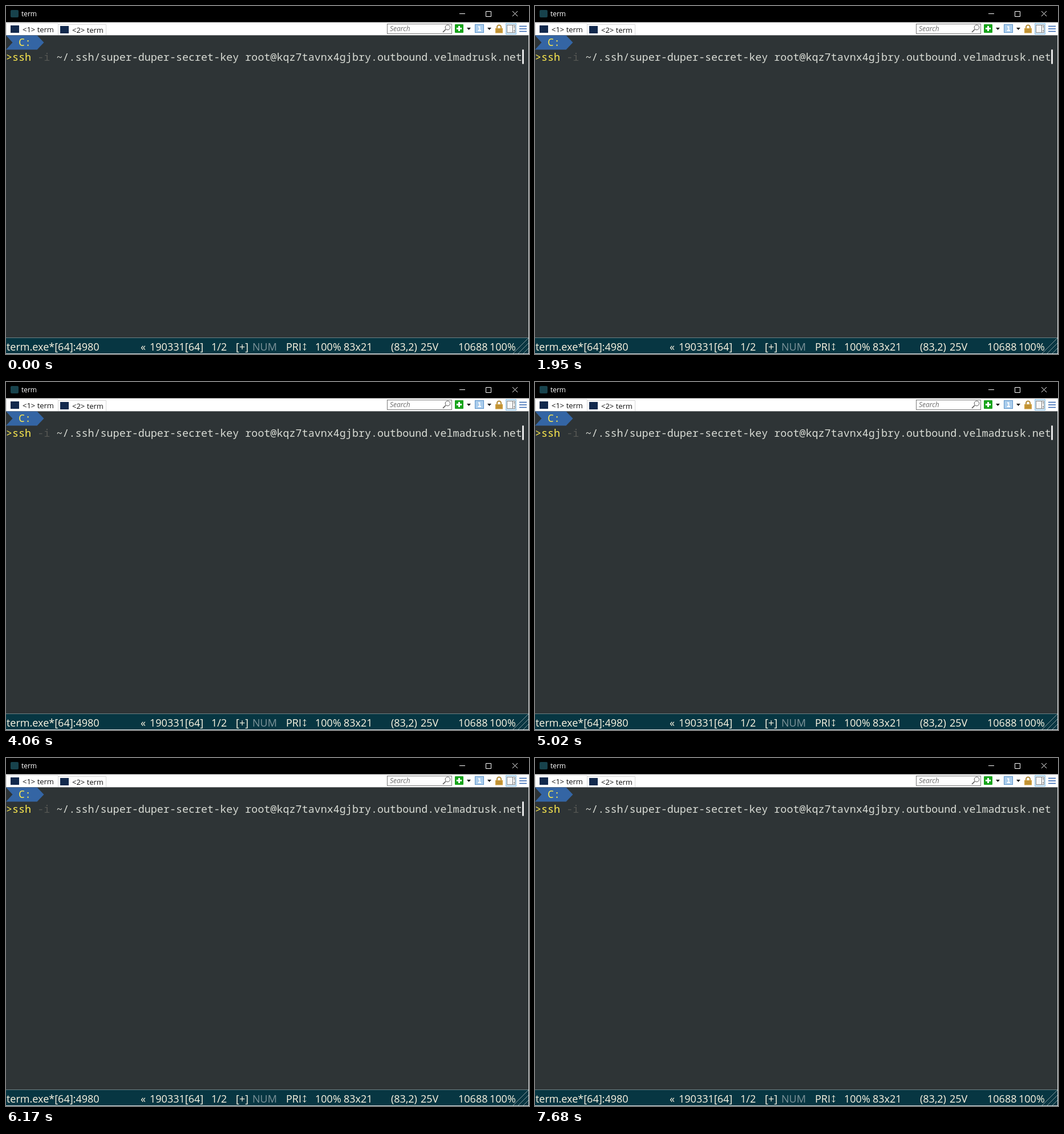
Recreate the animation shown at these times as an HTML page. Size 917 by 610 pixels, loop 8000 ms.

```html
<!DOCTYPE html>
<html lang="en">
<head>
<meta charset="utf-8">
<title>Terminal</title>
<style>
  html, body { margin: 0; width: 100%; height: 100%; overflow: hidden; background: #2e3436; }
  svg { display: block; }
  text { white-space: pre; }
  .ui { font: 12px "Open Sans", "Noto Sans", sans-serif; }
  .tab { font-size: 13px; }
  .hint { font-style: italic; fill: #6d6d6d; }
  .status { font-size: 18px; fill: #fdf6e3; }
  .mono { font: 18.4px "Noto Sans Mono", "DejaVu Sans Mono", monospace; fill: #d9dcd5; }
  .line { fill: none; stroke-width: 1; }
  .yellow { fill: #fce94f; }
</style>
</head>
<body>
<svg width="917" height="610" viewBox="0 0 917 610">
  <rect width="917" height="610" fill="#2e3436"/>

  <!-- title bar -->
  <rect width="917" height="29" fill="#000"/>
  <rect x="8" y="7" width="14" height="13" rx="2" fill="#17424c"/>
  <text class="ui" x="27" y="18" fill="#fff">term</text>
  <path class="line" stroke="#fff" d="M795 13.5h10M841.5 9.5h9v9h-9zM888 9l9 9m0-9l-9 9"/>

  <!-- tabs -->
  <rect y="28.5" width="917" height="22.8" fill="#fff"/>
  <path class="line" stroke="#d9d9d9" d="M.5 51V30.5H91.5V51M91.5 32.5H175.5V51"/>
  <g fill="#12294d">
    <rect x="8" y="34" width="15" height="13"/>
    <rect x="95" y="35" width="15" height="13"/>
  </g>
  <g class="ui" fill="#111">
    <text class="tab" x="29" y="46">&lt;1&gt; term</text>
    <text class="tab" x="116" y="47">&lt;2&gt; term</text>
  </g>

  <!-- toolbar -->
  <rect x="668.5" y="31.5" width="113" height="17" fill="#fff" stroke="#7a7a7a"/>
  <text class="ui hint" x="673" y="44">Search</text>
  <g class="line" stroke="#555">
    <circle cx="774.5" cy="37.5" r="4.3"/>
    <path d="M771 41l-5 5" stroke-width="1.6"/>
  </g>
  <rect x="787" y="32" width="15" height="15" rx="1" fill="#17a31b"/>
  <path d="M794.5 35v9M790 39.5h9" stroke="#fff" stroke-width="3"/>
  <path d="M808 38h7l-3.5 4zM844 38h7l-3.5 4z" fill="#111"/>
  <rect x="822.5" y="32.5" width="15" height="14" fill="#a9ccec" stroke="#5b93c9"/>
  <path d="M828 36.5h2.5v6M827.5 43h5.5" fill="none" stroke="#fff" stroke-width="1.8"/>
  <path d="M861 40v-3a3.5 3.5 0 0 1 7 0v3" fill="none" stroke="#b48a35" stroke-width="2"/>
  <rect x="858" y="39" width="13" height="8.5" fill="#cc9c3b"/>
  <path d="M860 42h9M860 45h9" stroke="#a97c24"/>
  <rect x="876.5" y="30.5" width="18" height="19" fill="#d3e9f8" stroke="#8fc3e8"/>
  <rect x="878.5" y="33.5" width="14" height="13" fill="#f7f7f7" stroke="#8a8a8a"/>
  <path d="M888.5 34v12M890 36.5h2M890 43.5h2" stroke="#777"/>
  <path d="M900 35.5h13M900 40h13M900 44.5h13" stroke="#2f62ae" stroke-width="1.7"/>

  <!-- prompt -->
  <path d="M0 51.5H54.5L66.5 64L54.5 76.5H0L11.5 64z" fill="#3465a4"/>
  <text class="mono yellow" x="22" y="70">C:</text>
  <text class="mono" x="0" y="95.6"><tspan class="yellow">&gt;ssh</tspan><tspan fill="#555753"> -i</tspan> ~/.ssh/super-duper-secret-key root@kqz7tavnx4gjbry.outbound.velmadrusk.net</text>
  <rect id="cursor" x="905.2" y="76.4" width="2.6" height="25.2" fill="#fff"/>

  <!-- status bar -->
  <rect y="581" width="917" height="28" fill="#073642"/>
  <path d="M0 581.5h917" stroke="#6d7f84"/>
  <g class="ui" id="status"></g>
  <path class="line" stroke="#fdf6e3" d="M523.5 592v11M521 594.5l2.5-3 2.5 3M521 600.5l2.5 3 2.5-3"/>
  <path class="line" stroke="#8b9da0" d="M889 609l27-27M898 609l18-18M907 609l9-9"/>
  <path class="line" stroke="#e4e6e6" d="M916.5 51v559M0 609.5h917"/>
</svg>
<script>
  const status = [
    [1, "term.exe*[64]:4980"], [236, "«"], [252, "190331[64]"], [360, "1/2"],
    [403, "[+]"], [432, "NUM", "#7f959b"], [491, "PRI"], [542, "100%"],
    [592, "83x21"], [675, "(83,2)"], [727, "25V"], [793, "10688"], [848, "100%"]
  ];
  const bar = document.getElementById("status");
  for (const [x, label, color] of status) {
    const text = document.createElementNS(bar.namespaceURI, "text");
    text.setAttribute("class", "status");
    text.setAttribute("x", x);
    text.setAttribute("y", 604);
    if (color) text.style.fill = color;
    text.textContent = label;
    bar.append(text);
  }

  // The cursor starts visible and flips at each of these times.
  const LOOP = 8000;
  const flips = [400, 800, 1360, 1950, 2500, 2910, 3500, 4060, 4590, 5020, 5610, 6170, 6720, 7120, 7680];
  const cursor = document.getElementById("cursor");
  const start = performance.now();

  function draw(now) {
    const t = Math.max(0, now - start) % LOOP;
    const count = flips.filter(f => f <= t).length;
    cursor.setAttribute("visibility", count % 2 ? "hidden" : "visible");
    requestAnimationFrame(draw);
  }
  draw(start);
</script>
</body>
</html>
```
